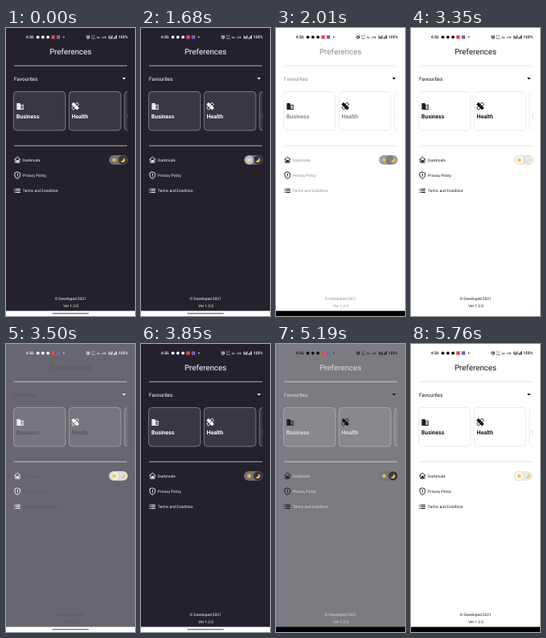
Write an HTML page that moves like this. It is 162 px wide and 360 px high and loops after 5.79 s.

```html
<!DOCTYPE html>
<html lang="en">
<head>
<meta charset="utf-8">
<title>Preferences</title>
<style>
/* 0 = dark theme, 1 = light theme; each layer switches at its own pace */
@property --surface { syntax: "<number>"; inherits: true; initial-value: 0; }
@property --ink { syntax: "<number>"; inherits: true; initial-value: 0; }
@property --icon { syntax: "<number>"; inherits: true; initial-value: 0; }
@property --nav { syntax: "<number>"; inherits: true; initial-value: 0; }
@property --thumb { syntax: "<number>"; inherits: true; initial-value: 0; }

html, body { margin: 0; width: 100%; height: 100%; overflow: hidden; background: #24212d; }
svg { display: block; }
#stage {
  --loop: 5790ms;
  width: 162px; height: 360px;
  font-family: Roboto, sans-serif;
  font-size: 4.8px;
  text-rendering: geometricPrecision;
  animation: surface var(--loop) linear infinite, ink var(--loop) linear infinite,
    icon var(--loop) step-end infinite, nav var(--loop) step-end infinite,
    thumb var(--loop) ease-in-out infinite;
}
@keyframes surface {
  0%, 31.26% { --surface: 0; } 34.72%, 58.2% { --surface: 1; }
  61.49%, 88.26% { --surface: 0; } 91.71%, 100% { --surface: 1; }
}
@keyframes ink {
  0%, 31.78% { --ink: 0; } 37.65%, 58.72% { --ink: 1; }
  64.77%, 88.77% { --ink: 0; } 94.82%, 100% { --ink: 1; }
}
@keyframes icon {
  0% { --icon: 0; } 32.3% { --icon: 1; } 59.24% { --icon: 0; } 89.29%, 100% { --icon: 1; }
}
@keyframes nav {
  0% { --nav: 0; } 30.05% { --nav: 1; } 56.65% { --nav: 0; } 86.87%, 100% { --nav: 1; }
}
@keyframes thumb {
  0%, 32.3% { --thumb: 0; } 38%, 59.24% { --thumb: 1; }
  65.63%, 89.29% { --thumb: 0; } 96.03%, 100% { --thumb: 1; }
}
@keyframes touch {
  0% { opacity: 0; transform: translate(136px, 165px); }
  28.84% { opacity: .6; transform: translate(136px, 165px); }
  32.4% { opacity: 0; }
  55.61% { opacity: .6; transform: translate(148px, 165px); }
  59.24% { opacity: 0; }
  85.84% { opacity: .6; transform: translate(136px, 165px); }
  89.46%, 100% { opacity: 0; }
}
@keyframes rateA { 0% { opacity: 1; } 16.41% { opacity: 0; } 83.07%, 100% { opacity: 1; } }
@keyframes rateB { 0% { opacity: 0; } 16.41% { opacity: 1; } 83.07%, 100% { opacity: 0; } }

.bg { fill: color-mix(in srgb, #fff calc(var(--surface) * 100%), #24212d); }
.card {
  fill: color-mix(in srgb, #fff calc(var(--surface) * 100%), #3a3743);
  stroke: color-mix(in srgb, #e6e6e6 calc(var(--surface) * 100%), #8d8b93);
  stroke-width: .8;
}
.rule { fill: color-mix(in srgb, #e2e2e2 calc(var(--surface) * 100%), #c2c1c6); }
.ink { fill: color-mix(in srgb, #161616 calc(var(--ink) * 100%), #fff); }
.icons {
  --c: color-mix(in srgb, #111 calc(var(--icon) * 100%), #fff);
  fill: var(--c);
}
.line { fill: none; stroke: var(--c); stroke-width: .9; stroke-linejoin: round; stroke-linecap: round; }
.nav { fill: color-mix(in srgb, #000 calc(var(--nav) * 100%), #fff); }
.pill { fill: #7f7d85; opacity: calc(1 - var(--icon)); }
.track { fill: color-mix(in srgb, #e9e8eb calc(var(--thumb) * 100%), #737179); }
.thumb {
  fill: color-mix(in srgb, #fff calc(var(--thumb) * 100%), #35323d);
  stroke: #77777a; stroke-opacity: .45; stroke-width: .5;
  transform: translateX(calc(var(--thumb) * -11px));
}
.touch { fill: #f1efec; stroke: #aaa7a4; stroke-width: .5; opacity: 0; animation: touch var(--loop) step-end infinite; }
.rate { font-size: 3.2px; }
.a { animation: rateA var(--loop) step-end infinite; }
.b { animation: rateB var(--loop) step-end infinite; }
.bold { font-size: 7px; font-weight: 700; }
.mid { text-anchor: middle; }
</style>
</head>
<body>
<svg id="stage" viewBox="0 0 162 360">
  <defs>
    <clipPath id="list"><rect x="8" y="76" width="144.5" height="56"/></clipPath>
  </defs>
  <rect class="bg" width="162" height="360"/>

  <!-- status bar -->
  <g class="icons">
    <g font-size="5" font-weight="500">
      <text x="25" y="13.2">4:56</text>
      <text x="141" y="13.2">100%</text>
    </g>
    <circle cx="40" cy="11.4" r="1.9"/>
    <circle cx="46.3" cy="11.4" r="1.9"/>
    <circle cx="52.7" cy="11.4" r="1.9"/>
    <rect x="57" y="9.2" width="4.4" height="4.4" fill="#e34850"/>
    <rect x="63.6" y="9.2" width="4.4" height="4.4" fill="#6868b8"/>
    <circle cx="72.6" cy="11.4" r=".8"/>
    <circle class="line" cx="103" cy="11.6" r="1.7"/>
    <path class="line" d="M103 10.7v1h.7M101 9.6l.7-.6M105 9.6l-.7-.6" style="stroke-width:.5"/>
    <g class="rate">
      <text class="a" x="107" y="11.3">3.2</text>
      <text class="b" x="107" y="11.3">0.5</text>
      <text x="107" y="14.1" font-size="2.6">KB/s</text>
      <text x="114" y="13.2" font-weight="700">Vo</text>
      <text x="120.5" y="13.2" font-weight="700">LTE</text>
    </g>
    <path d="M129 9.4h1v4.2h-1zM131 10.7h1v2.9h-1zM132.6 9.2h1v4.4h-1zM135 12h1v1.6h-1zM136.5 10.6h1v3h-1zM138 9.1h1v4.5h-1z"/>
  </g>

  <text class="ink mid" x="81" y="33.2" font-size="9.9">Preferences</text>
  <rect class="rule" x="10" y="46.7" width="142" height=".9"/>
  <text class="ink" x="10" y="65.5" font-size="6.45">Favourites</text>
  <path class="icons" d="M145.8 62.1h4.6l-2.3 2.5z"/>

  <g clip-path="url(#list)">
    <rect class="card" x="9.6" y="79.5" width="65" height="48.5" rx="4"/>
    <rect class="card" x="79.2" y="79.5" width="65" height="48.5" rx="4"/>
    <rect class="card" x="148.8" y="79.5" width="65" height="48.5" rx="4"/>
    <g class="ink bold">
      <text x="13" y="112.8">Business</text>
      <text x="82.5" y="112.8">Health</text>
      <text x="152" y="112.8">Sport</text>
    </g>
    <g class="icons">
      <!-- office block -->
      <g transform="translate(13.5 94)">
        <path fill-rule="evenodd" d="M0 0h4.3v1.7h4.3v6.2H0zM5 2.6v4.4h2.8V2.6z"/>
        <path class="line" d="M1.2 1.4v5.6M3 1.4v5.6" style="stroke:#77757d;stroke-width:.7;stroke-dasharray:.7 1;stroke-linecap:butt"/>
        <path d="M5.9 3.5h1v.9h-1zM5.9 5.2h1v.9h-1z"/>
      </g>
      <!-- crossed plasters -->
      <g transform="translate(87 97.7) rotate(45)">
        <rect x="-5" y="-1.9" width="10" height="3.8" rx=".7"/>
        <rect class="line" x="-1.7" y="-4.8" width="3.4" height="9.6" rx=".6"/>
        <path class="line" d="M-.7 0h1.4M0 -.7v1.4" style="stroke:#66646c;stroke-width:.6"/>
      </g>
    </g>
  </g>

  <rect class="rule" x="10" y="146.7" width="142" height=".9"/>

  <g class="icons">
    <path class="line" d="M10.8 164.3l3.6-3.2 3.6 3.2M11.8 163.8v4.4h5.2v-4.4"/>
    <path d="M12.8 167.4v-1.2q.2-1 1.1-.9q.6-1.2 1.6-.1q.8.5.5 2.2z"/>
    <path class="line" d="M14.4 180l3.4 1.4v2.7q-.2 3-3.4 4.5q-3.2-1.5-3.4-4.5v-2.7z"/>
    <path d="M14 182.1h.9v2.7H14zM14 185.5h.9v.9H14z"/>
    <path d="M10.5 200.7h1.1v1h-1.1zM10.5 202.8h1.1v1h-1.1zM10.5 204.9h1.1v1h-1.1zM12.4 200.7H18v1h-5.6zM12.4 202.8H18v1h-5.6zM12.4 204.9H18v1h-5.6z"/>
  </g>
  <g class="ink">
    <text x="21" y="166.7">Darkmode</text>
    <text x="21" y="186.2">Privacy Policy</text>
    <text x="21" y="205.2">Terms and Condition</text>
    <text class="mid" x="81" y="339.8">© Developed 2021</text>
    <text class="mid" x="81.5" y="349.2">Ver 1.2.0</text>
  </g>

  <!-- theme switch -->
  <rect class="track" x="129.3" y="159" width="23.6" height="11.8" rx="5.9"/>
  <circle class="thumb" cx="147" cy="164.9" r="5.7"/>
  <g transform="translate(135.8 164.9)">
    <circle r="2" fill="#f7c52d"/>
    <circle r="2.7" fill="none" stroke="#f2b632" stroke-width="1" stroke-dasharray=".9 1.22"/>
  </g>
  <path fill="#f6c943" d="M147.6 161.9a3.2 3.2 0 1 1-4 4.6a3.7 3.7 0 0 0 4-4.6z"/>
  <circle class="touch" r="5.6"/>

  <rect class="nav" y="353.6" width="162" height="6.4"/>
  <rect class="pill" x="58" y="356" width="46" height="1.5" rx=".75"/>
</svg>
</body>
</html>
```
